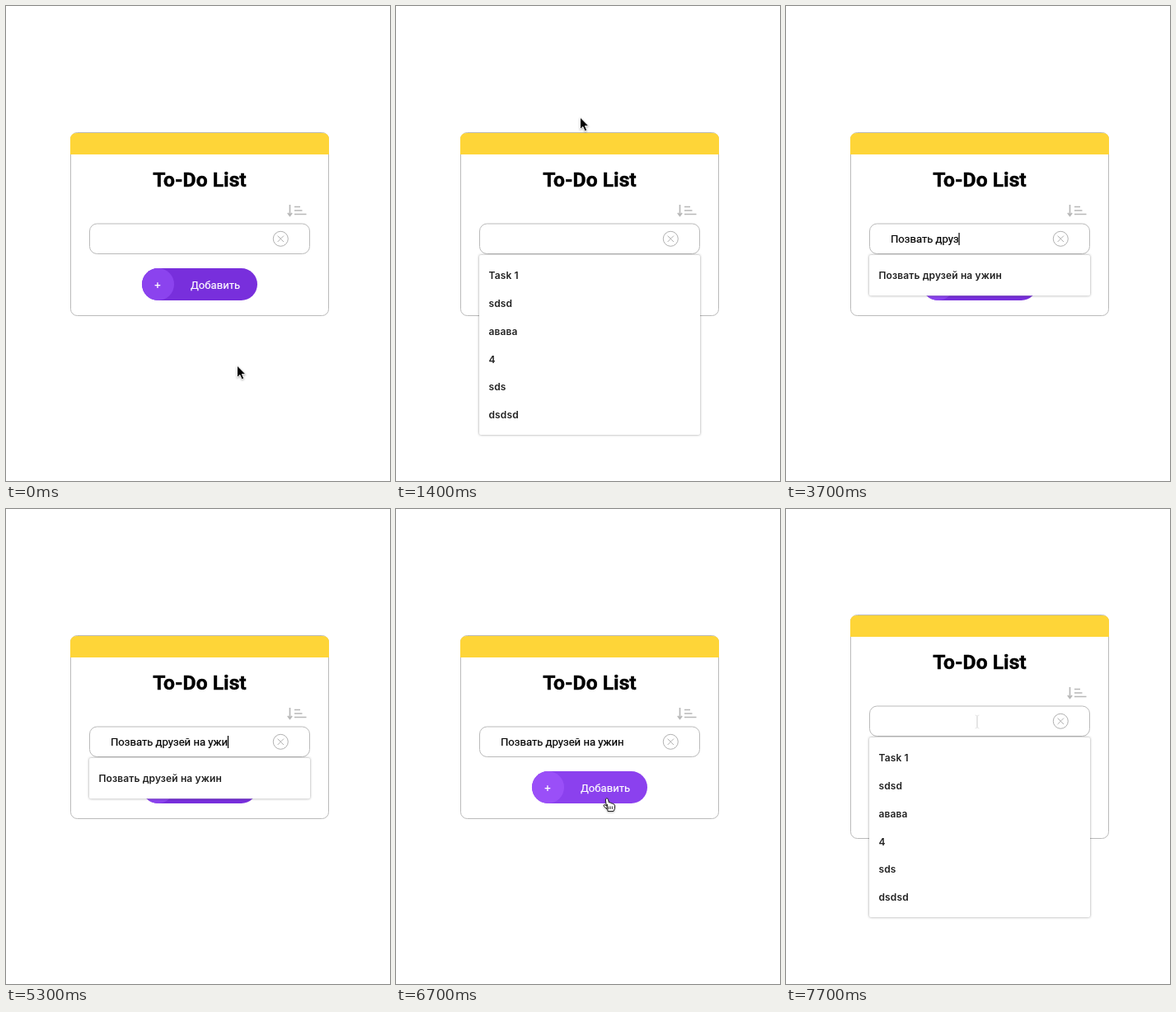
Animation of 466 by 576 pixels, one loop 8000 ms. Source, as an HTML page:

```html
<!DOCTYPE html>
<html lang="ru">
<head>
<meta charset="utf-8">
<title>To-Do List</title>
<style>
  html, body { margin: 0; width: 100%; height: 100%; overflow: hidden; background: #fff; }
  svg { display: block; width: 100%; height: 100%; }
  text { font: 13.1px Roboto, sans-serif; fill: #000; stroke: #000; stroke-width: .2; white-space: pre; }
  .title { font-size: 24.7px; font-weight: 700; stroke-width: .4; text-anchor: middle; }
  .outline { fill: #fff; stroke: #bababa; }
  .icon { fill: none; stroke: #b0b0b0; }
  .sort { fill: none; stroke: #b8b8b8; stroke-width: 1.7; }
  .base { fill: #782fdc; }
  .knob { fill: #8b43ee; }
  .hover .base { fill: #8b41ee; }
  .hover .knob { fill: #9a4ff8; }
  .button text { fill: #fff; stroke: #fff; }
  .menu rect { fill: #fff; filter: drop-shadow(0 .5px 1.5px rgba(0, 0, 0, .4)); }
  .menu text { font: 600 12px Inter, sans-serif; letter-spacing: .12px; fill: #222; stroke: none; }
  .pointer { filter: drop-shadow(0 1px 1px rgba(0, 0, 0, .3)); }
</style>
</head>
<body>
<svg viewBox="0 0 466 576" xmlns="http://www.w3.org/2000/svg">
  <defs>
    <g id="field">
      <rect class="outline" x="101.5" y="264" width="267" height="36.5" rx="9"/>
      <g class="icon">
        <circle cx="333.3" cy="282.3" r="9"/>
        <path d="M329.6 278.6l7.4 7.4m0-7.4l-7.4 7.4"/>
      </g>
    </g>
  </defs>

  <g id="card">
    <rect id="panel" class="outline" x="78.5" y="153.5" width="313" height="222" rx="8"/>
    <path d="M78 180v-18q0-8 8-8h298q8 0 8 8v18z" fill="#fed538"/>
    <text class="title" x="235" y="219">To-Do List</text>
    <path class="sort" d="M344.5 241v13m-2.6-3l2.6 3.4l2.6-3.4M350 243.500h7m-7 4.500h9.500m-9.500 4.500h14.500"/>

    <use href="#field"/>
    <text id="value" x="127" y="287"></text>
    <rect id="caret" y="275" width="1.2" height="15"/>

    <g id="item">
      <use href="#field" y="49"/>
      <text x="127" y="336">Позвать друзей на ужин</text>
    </g>

    <g id="button" class="button">
      <rect class="base" x="165" y="318" width="140" height="39" rx="19.5"/>
      <circle class="knob" cx="184.5" cy="337.5" r="19.5"/>
      <text x="180.300" y="342.500">+</text>
      <text x="224" y="342.500">Добавить</text>
    </g>

    <g id="menu" class="menu">
      <rect id="sheet" x="101" y="302" width="268" rx="2"/>
      <g id="options"></g>
    </g>
  </g>

  <g id="cursor">
    <path id="arrow" class="pointer" d="M0 0V14.500L3.400 11.400L5.700 16.700L8.200 15.600L5.900 10.400H10.300Z" stroke="#fff" stroke-width=".9"/>
    <g id="hand" class="pointer" stroke="#222" stroke-linejoin="round">
      <path d="M-2.600 1Q-2.600-1.200-1.200-1.200Q.1-1.200.5.6L1.400 4Q3.600 3.200 4.200 5Q6.200 4.400 6.700 6Q8.500 5.700 8.600 7.800Q9 11.500 7 14.500H0Q-1-1-1 12L-4.800 8.300Q-5.400 6.400-3.600 6.700L-1.700 8Z" fill="#fff"/>
      <path d="M1.500 8.500v3.500m2-3.500v3.500m2-3.500v3.500" fill="none" stroke-width=".8"/>
    </g>
    <path id="beam" d="M-2.500-8Q0-8 0-6V6Q0 8-2.500 8M2.500-8Q0-8 0-6V6Q0 8 2.500 8" fill="none" stroke="#000" stroke-opacity=".1"/>
  </g>
</svg>

<script>
const LOOP = 8000, STEP = 100, BLINK = 500;
const ROW = 33.75, ITEM_HEIGHT = 49, LIFT = ITEM_HEIGHT / 2;
const PHRASE = 'Позвать друзей на ужин';
const HISTORY = ['Task 1', 'sdsd', 'авава', '4', 'sds', 'dsdsd'];

// Moments in the loop
const FOCUS = 700, FIRST_KEY = 1700, LAST_KEY = 5400, WAKE = 5900;
const PRESS = 6600, ADDED = 6800, REFOCUS = 7200;
const KEY_TIME = (LAST_KEY - FIRST_KEY) / (PHRASE.length - 1);

// Each stroke of the pointer is a quadratic curve
const strokes = [
  { start: 0, end: 500, points: [[280.5, 436], [480, 80], [194, 284]] },
  { start: FOCUS, end: 1400, points: [[194, 284], [215, 200], [223.5, 135]] },
  { start: WAKE, end: 6500, points: [[194, 184], [210, 270], [257, 352]] },
  { start: 6900, end: REFOCUS, points: [[257, 352], [245, 300], [232, 258]] }
];

const ui = Object.fromEntries([...document.querySelectorAll('[id]')].map(el => [el.id, el]));
const show = (el, on) => { el.style.display = on ? '' : 'none'; };
const within = (v, low, high) => v >= low && v <= high;
const mix = (a, b, k) => a + (b - a) * k;
const shift = (el, y) => el.setAttribute('transform', `translate(0 ${y})`);

function pointerAt(t) {
  const { start, end, points: [a, b, c] } = strokes.findLast(s => s.start <= t);
  const k = Math.min(1, (t - start) / (end - start));
  return [0, 1].map(i => mix(mix(a[i], b[i], k), mix(b[i], c[i], k), k));
}

function drawMenu(words) {
  ui.options.innerHTML = words.map((word, i) =>
    `<text x="112.5" y="${331.3 + i * ROW}">${word}</text>`).join('');
  ui.sheet.setAttribute('height', 15.5 + words.length * ROW);
}

function drawField(t) {
  const typed = Math.floor((t - FIRST_KEY) / KEY_TIME + 1e-6) + 1;
  const count = t >= ADDED ? 0 : Math.max(0, Math.min(PHRASE.length, typed));
  ui.value.textContent = PHRASE.slice(0, count);

  const focused = within(t, FOCUS, PRESS - 1) || t >= REFOCUS;
  const typing = within(t, FIRST_KEY, LAST_KEY);
  const blinkStart = t >= REFOCUS ? REFOCUS : t > LAST_KEY ? LAST_KEY : FOCUS;
  show(ui.caret, focused && (typing || Math.floor((t - blinkStart) / BLINK) % 2 === 0));
  ui.caret.setAttribute('x', 126.8 + (count ? ui.value.getComputedTextLength() : 0));

  show(ui.menu, within(t, FOCUS, LAST_KEY - 1) || t >= REFOCUS);
  drawMenu(count ? [PHRASE] : HISTORY);
}

function drawCursor(t, grown) {
  const [x, y] = pointerAt(t);
  const buttonTop = 318 + LIFT * grown, fieldTop = 264 - LIFT * grown;
  const overButton = within(x, 165, 305) && within(y, buttonTop, buttonTop + 39);
  const overField = within(x, 101, 369) && within(y, fieldTop, fieldTop + 37);
  show(ui.cursor, t < FIRST_KEY || t >= WAKE);
  ui.cursor.setAttribute('transform', `translate(${x} ${y})`);
  show(ui.hand, overButton);
  show(ui.beam, overField);
  show(ui.arrow, !overButton && !overField);
  ui.button.classList.toggle('hover', overButton);
}

function draw(now) {
  const t = Math.floor(now % LOOP / STEP) * STEP;
  const grown = Number(t >= ADDED);
  shift(ui.card, -Math.ceil(LIFT) * grown);
  shift(ui.button, ITEM_HEIGHT * grown);
  ui.panel.setAttribute('height', 222 + ITEM_HEIGHT * grown);
  show(ui.item, grown);
  drawField(t);
  drawCursor(t, grown);
}

let start;
function tick(now) {
  start ??= now;
  draw(now - start);
  requestAnimationFrame(tick);
}
draw(0);
requestAnimationFrame(tick);
</script>
</body>
</html>
```
